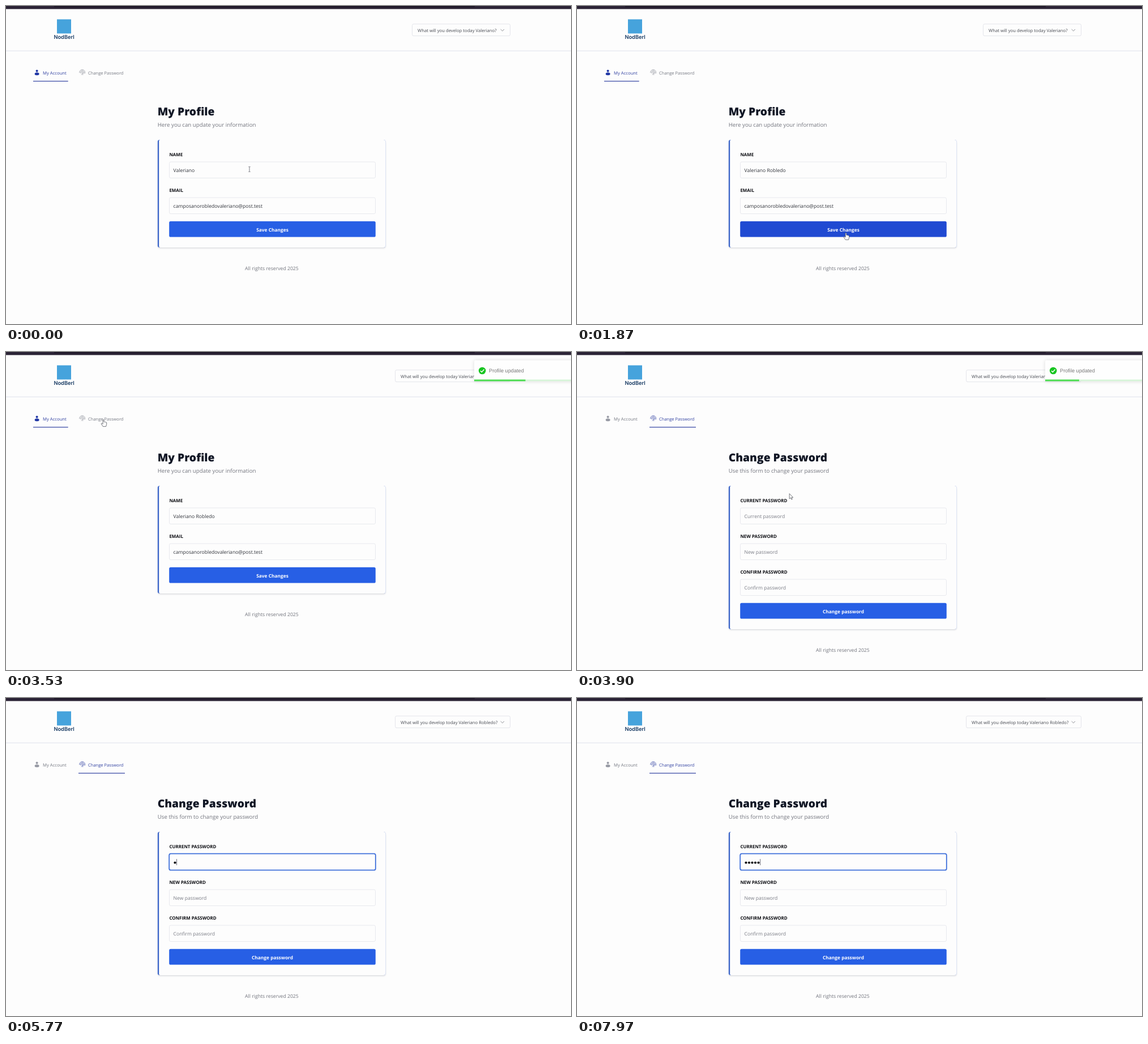
These frames come from a looping animation (998 px wide and 561 px high, 8 s). An HTML page with a canvas:

```html
<!DOCTYPE html>
<html lang="en">
<head>
<meta charset="utf-8">
<title>Account settings</title>
<style>
  html, body { margin: 0; width: 100%; height: 100%; overflow: hidden; background: #fdfdfd; }
  canvas { display: block; width: 998px; height: 561px; }
</style>
</head>
<body>
<canvas id="stage"></canvas>
<script>
const W = 998, H = 561, LOOP = 8000;
const canvas = document.getElementById('stage');
const dpr = window.devicePixelRatio || 1;
canvas.width = W * dpr;
canvas.height = H * dpr;
const ctx = canvas.getContext('2d');
const SANS = '"Open Sans", "Noto Sans", sans-serif';

const FIRST = 'Valeriano', LAST = ' Robledo';
const EMAIL = 'camposanorobledovaleriano@post.test';

const PAPER = '#fdfdfd', BLUE = '#275fe5', BLUE_HOVER = '#204ad2', RING = '#3f70da';
const ACTIVE = '#3343a2', MUTED = '#767983', INK = '#0f1524';

// Moments of the session, in ms
const T = { focusName: 200, type: 520, save: 1820, toast: 2250, page: 3560,
            focusPass: 4280, pass: 5700, toastEnd: 4640 };

const clamp = (v, lo, hi) => Math.min(hi, Math.max(lo, v));
const smooth = p => p * p * (3 - 2 * p);
const linear = p => p;

// Interpolates rows of [time, ...values]
function track(rows, t, ease = linear) {
  if (t <= rows[0][0]) return rows[0].slice(1);
  for (let i = 1; i < rows.length; i++) {
    const a = rows[i - 1], b = rows[i];
    if (t < b[0]) {
      const p = ease((t - a[0]) / (b[0] - a[0]));
      return a.slice(1).map((v, k) => v + (b[k + 1] - v) * p);
    }
  }
  return rows[rows.length - 1].slice(1);
}

// Number of keys pressed by time t
const keys = (t, start, gap, n) => clamp(Math.floor((t - start) / gap) + 1, 0, n);

// Caret stays lit after a key, then blinks
function caretOn(t, runs) {
  let last = 0;
  for (const [start, gap, n] of runs) {
    const k = keys(t, start, gap, n);
    if (k) last = start + (k - 1) * gap;
  }
  return (t - last) % 480 < 240;
}

function text(str, x, y, size, color, { weight = 400, align = 'left', family = SANS } = {}) {
  ctx.font = `${weight} ${size}px ${family}`;
  ctx.textAlign = align;
  ctx.fillStyle = color;
  ctx.fillText(str, x, y);
  return ctx.measureText(str).width;
}

function box(x, y, w, h, r, fill, stroke, line = 1) {
  ctx.beginPath();
  ctx.roundRect(x, y, w, h, r);
  if (fill) { ctx.fillStyle = fill; ctx.fill(); }
  if (stroke) { ctx.strokeStyle = stroke; ctx.lineWidth = line; ctx.stroke(); }
}

function rect(x, y, w, h, color) {
  ctx.fillStyle = color;
  ctx.fillRect(x, y, w, h);
}

function shadow(color, blur, dy) {
  ctx.shadowColor = color;
  ctx.shadowBlur = blur * dpr;
  ctx.shadowOffsetY = dy * dpr;
}

function line(points, color, width) {
  ctx.beginPath();
  points.forEach(([x, y]) => ctx.lineTo(x, y));
  ctx.strokeStyle = color;
  ctx.lineWidth = width;
  ctx.stroke();
}

function drawHeader(t) {
  rect(0, 0, W, 5.4, '#2c2436');
  rect(85, 0, 743, 2, '#1d1627');
  rect(0, 78.6, W, 1.1, '#e2e3ee');

  box(90, 23.5, 25, 25, 0, '#46a3dc');
  text('NodBerl', 102.6, 58.4, 9.3, '#173a63', { weight: 600, align: 'center', family: 'Inter, sans-serif' });

  const renamed = t >= T.toast;
  const left = renamed ? 687.5 : 717.5;
  box(left, 31.8, 890.5 - left, 20.9, 2.5, PAPER, '#e4e5eb');
  text(`What will you develop today ${FIRST}${renamed ? LAST : ''}?`, left + 9.6, 45.6, 7.7, '#474a52');
  line([[873.6, 41], [876.8, 44.2], [880, 41]], '#85878e', 0.9);
}

function personIcon(x, y, color) {
  ctx.fillStyle = color;
  ctx.beginPath();
  ctx.arc(x, y - 3, 2, 0, 7);
  ctx.fill();
  ctx.beginPath();
  ctx.ellipse(x, y + 2.2, 4, 2.5, 0, 0, 7);
  ctx.fill();
}

function printIcon(x, y, color) {
  ctx.strokeStyle = color;
  ctx.lineWidth = 0.7;
  [[1.5, 2.9, 6.5], [3.2, 2.6, 6.9], [4.9, 3, 6.7]].forEach(([r, from, to]) => {
    ctx.beginPath();
    ctx.arc(x, y, r, from, to);
    ctx.stroke();
  });
  line([[x, y], [x - 0.2, y + 2], [x - 1.6, y + 4.4]], color, 0.7);
  line([[x + 1.5, y + 0.4], [x + 0.8, y + 4.6]], color, 0.7);
}

function drawTabs(second) {
  personIcon(54.6, 117.6, second ? '#989ba5' : '#2138a6');
  text('My Account', 65, 120.7, 7.7, second ? MUTED : ACTIVE);
  printIcon(134.7, 117.2, second ? ACTIVE : '#8b8e98');
  text('Change Password', 145, 120.7, 7.55, second ? ACTIVE : MUTED);
  if (second) rect(128, 132, 82, 1.2, ACTIVE);
  else rect(48, 132, 61.7, 1.2, ACTIVE);
}

function drawCard(bottom) {
  const h = bottom - 236;
  shadow('rgba(30,35,60,.16)', 2.6, 1.5);
  box(268, 237, 402.6, h - 1, 4, PAPER);
  shadow('transparent', 0, 0);
  ctx.save();
  ctx.beginPath();
  ctx.roundRect(267.7, 236, 403, h, 4);
  ctx.clip();
  rect(267.7, 236, 403, h, '#3a64c8');
  box(270.2, 236, 402, h, [2, 0, 0, 2], PAPER);
  ctx.restore();
}

function field(label, y, value, color, { focus = false, caret = false } = {}) {
  text(label, 288.4, y - 10, 7.95, '#0c0d12', { weight: 700 });
  if (focus) box(288.2, y - 0.3, 364.6, 29, 3, PAPER, RING, 1.8);
  else box(288.5, y, 364, 28.5, 2.5, PAPER, '#e6e7ec', 0.9);
  const w = text(value, 295.6, y + 17.9, 8.6, color);
  if (caret) rect(295.6 + w + 0.1, y + 9, 0.8, 11, '#33343c');
}

function button(label, y, hover) {
  box(288.2, y - 0.2, 364.6, 27.8, 2.6, hover ? BLUE_HOVER : BLUE);
  text(label, 470.5, y + 17.5, 8.35, '#fff', { weight: 700, align: 'center' });
}

function heading(title, sub) {
  text(title, 267.7, 193.4, 19.25, INK, { weight: 800 });
  text(sub, 267.7, 213.1, 9.73, '#74767f');
}

function footer(y) {
  text('All rights reserved 2025', 469.4, y, 8.68, '#72747d', { align: 'center' });
}

function drawProfile(t, mouse) {
  const n = keys(t, T.type, 100, LAST.length);
  const focus = t >= T.focusName && t < T.save;
  heading('My Profile', 'Here you can update your information');
  drawCard(426);
  field('NAME', 275, FIRST + LAST.slice(0, n), '#2f3239',
    { focus, caret: focus && caretOn(t - T.focusName, [[T.type - T.focusName, 100, LAST.length]]) });
  field('EMAIL', 338, EMAIL, '#2f3239');
  button('Save Changes', 380, mouse.onButton);
  footer(466.3);
}

const PASS_RUNS = [[T.pass, 100, 6], [6500, 90, 6], [7300, 150, 5]];

function drawPassword(t, mouse) {
  const [first, removed, second] = PASS_RUNS.map(run => keys(t, ...run));
  const dots = first - removed + second;
  const focus = t >= T.focusPass;
  const blink = focus && caretOn(t, [[T.focusPass, 1, 1], ...PASS_RUNS]);
  heading('Change Password', 'Use this form to change your password');
  drawCard(489);
  field('CURRENT PASSWORD', 275, dots ? '' : 'Current password', '#7a7c85', { focus });
  ctx.fillStyle = '#0d0e13';
  for (let i = 0; i < dots; i++) {
    ctx.beginPath();
    ctx.arc(298.5 + i * 5.5, 290.5, 2.1, 0, 7);
    ctx.fill();
  }
  if (blink) rect(295.6 + dots * 5.55, 284, 0.8, 11, '#4a4a5a');
  field('NEW PASSWORD', 338, 'New password', '#7a7c85');
  field('CONFIRM PASSWORD', 401, 'Confirm password', '#7a7c85');
  button('Change password', 443, mouse.onButton);
  footer(529.3);
  if (focus && !dots) {
    box(288.4, 304, 364.2, 22.6, 2, '#2b2634', '#3a3543', 0.6);
    text('Administrar contraseñas', 292.6, 318, 8, '#f4f3f6');
  }
}

function drawToast(t) {
  const gone = T.toastEnd + 320;
  if (t < T.toast || t > gone) return;
  const [dx, alpha] = t < T.toastEnd
    ? track([[T.toast, 900, 0], [T.toast + 190, -14, 1], [T.toast + 240, 6, 1],
             [T.toast + 290, -3, 1], [T.toast + 320, 0, 1]], t, p => 1 - (1 - p) ** 2)
    : track([[T.toastEnd, 0, 1], [T.toastEnd + 64, -12, 1], [gone, 1150, 0]], t);
  ctx.save();
  ctx.globalAlpha = alpha;
  ctx.translate(dx, 0);
  shadow('rgba(0,0,0,.14)', 6, 0.6);
  box(827, 14.5, 184, 37, 2.3, '#fefefe');
  shadow('transparent', 0, 0);
  ctx.fillStyle = '#18c521';
  ctx.beginPath();
  ctx.arc(841.2, 33, 6.3, 0, 7);
  ctx.fill();
  line([[838, 33.2], [840.3, 35.4], [844.5, 30.7]], '#fff', 1.5);
  text('Profile updated', 853, 36.3, 9.2, '#777', { family: '"Liberation Sans", Arial, sans-serif' });
  rect(827, 48.6, 184, 2.9, '#d6f4d8');
  rect(827, 48.6, clamp(151 - (t - 2800) * 0.0827, 0, 184), 2.9, '#4bdb50');
  ctx.restore();
}

const PATH = [
  [0, 430, 288], [1310, 430, 288], [1720, 475, 400], [2250, 475, 400],
  [2780, 781, 353], [2960, 781, 353], [3460, 172, 119], [3620, 172, 119],
  [3900, 375.2, 249.8], [4200, 420, 289]
];

function mouseAt(t) {
  const [x, y] = track(PATH, t, smooth);
  const second = t >= T.page;
  const inside = (l, top, r, b) => x > l && x < r && y > top && y < b;
  const inField = [275, 338, 401].slice(0, second ? 3 : 2).some(f => inside(288, f, 653, f + 29));
  const btn = second ? 443 : 380;
  const onButton = inside(288, btn, 653, btn + 28);
  const clickable = onButton || inside(128, 105, 210, 133);
  const hidden = (t >= T.type && t < 1310) || t >= T.pass;
  return { x, y, hidden, onButton, kind: inField ? 'ibeam' : clickable ? 'hand' : 'arrow' };
}

const ARROW = new Path2D('M0 0V9.2L2.2 7.3L3.7 10.4L5.1 9.8L3.7 6.8H6.5Z');
const HAND = new Path2D('M-.9 .8Q0-.6 .9 .8V4.2Q2 3.5 2.6 4.6Q3.8 4 4.2 5Q5.6 4.6 5.7 6V8.4L4.6 12.4H-.7L-3.7 8Q-4 6.6-2.6 6.8L-.9 8.1Z');

function drawMouse({ x, y, hidden, kind }) {
  if (hidden) return;
  ctx.save();
  ctx.translate(x, y);
  if (kind === 'ibeam') {
    line([[0, -4.3], [0, 4.3]], '#6d6f76', 0.9);
    [-4.4, 4.4].forEach(v => line([[-1.8, v], [1.8, v]], '#6d6f76', 0.7));
  } else {
    const shape = kind === 'hand' ? HAND : ARROW;
    ctx.fillStyle = '#fff';
    ctx.fill(shape);
    ctx.strokeStyle = '#54565e';
    ctx.lineWidth = 0.8;
    ctx.stroke(shape);
  }
  ctx.restore();
}

function draw(t) {
  ctx.setTransform(dpr, 0, 0, dpr, 0, 0);
  ctx.textRendering = 'geometricPrecision';
  rect(0, 0, W, H, PAPER);
  const mouse = mouseAt(t), second = t >= T.page;
  drawHeader(t);
  drawTabs(second);
  (second ? drawPassword : drawProfile)(t, mouse);
  drawToast(t);
  drawMouse(mouse);
}

const start = performance.now();
function tick(now) {
  draw(Math.max(0, now - start) % LOOP);
  requestAnimationFrame(tick);
}
draw(0);
requestAnimationFrame(tick);
</script>
</body>
</html>
```
